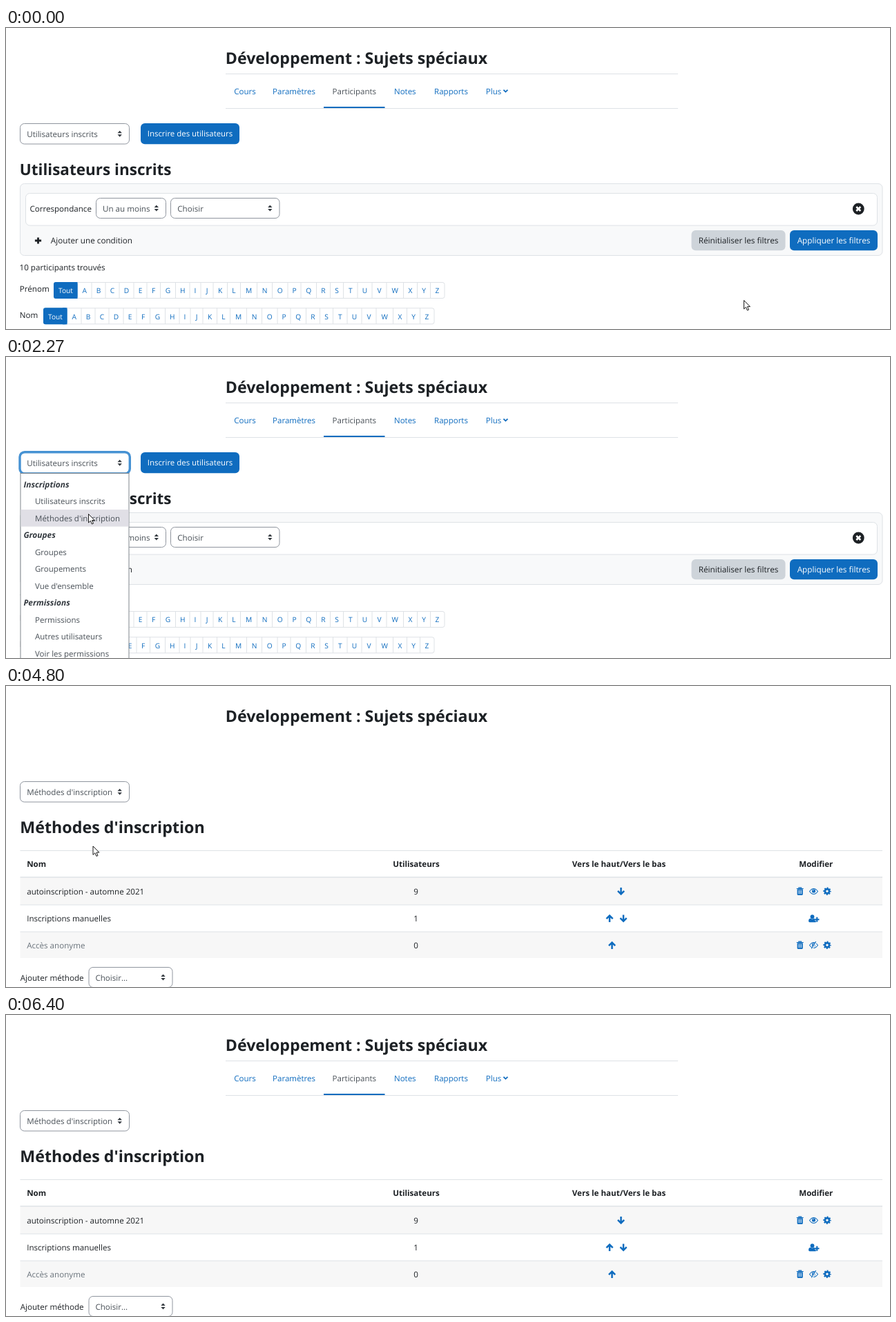
These frames come from a looping animation (1280x436 px, 7.59 s). An HTML page:

```html
<!DOCTYPE html>
<html lang="fr">
<head>
<meta charset="utf-8">
<title>Méthodes d'inscription</title>
<style>
html, body { margin: 0; width: 100%; height: 100%; overflow: hidden; background: #fff; }
svg { display: block; width: 100%; height: 100%; }
text { font-family: "Open Sans", "Noto Sans", sans-serif; white-space: pre; text-rendering: geometricPrecision; }
</style>
</head>
<body>
<svg id="stage" viewBox="0 0 1280 436"></svg>
<script>
const LOOP = 7590;
const BLUE = '#0f6cbf', INK = '#1d2125', GREY = '#495057', EDGE = '#8f959e', RULE = '#dee2e6';

// Drawing helpers
const text = (s, x, y, { size = 11.6, fill = INK, extra = '' } = {}) =>
  `<text x="${x}" y="${y}" font-size="${size}" fill="${fill}" ${extra}>${s}</text>`;
const mid = (s, x, y, o = {}) =>
  text(s, x, y, { ...o, extra: `text-anchor="middle" ${o.extra || ''}` });
const box = (x, y, w, h, fill, stroke = 'none', rx = 0, extra = '') =>
  `<rect x="${x}" y="${y}" width="${w}" height="${h}" rx="${rx}" fill="${fill}" stroke="${stroke}" ${extra}/>`;
const hline = (x1, x2, y, w = 1) =>
  `<path d="M${x1} ${y}H${x2}" stroke="${RULE}" stroke-width="${w}"/>`;
const group = (id, body) => `<g id="${id}">${body}</g>`;
const at = (x, y, body) => `<g transform="translate(${x} ${y})">${body}</g>`;
const bold = 'font-weight="700"';

const sorter = (x, y) =>
  at(x, y, `<path d="M-3.2-1L0-4.4 3.2-1ZM-3.2 1L0 4.4 3.2 1Z" fill="#343a40"/>`);
const select = (x, y, w, h, arrowX) =>
  box(x, y, w, h, '#fff', EDGE, 6) + sorter(arrowX, y + h / 2);
const button = (s, x, y, w, h, fill, ink, size) =>
  box(x, y, w, h, fill, 'none', 6) + mid(s, x + w / 2, y + h / 2 + 4.3, { size, fill: ink });

// Icons, each centred on its own origin
const arrowDown = `<path d="M0-5.4V4M-4.6-.6L0 4 4.6-.6" fill="none" stroke="${BLUE}" stroke-width="2.5"/>`;
const arrowUp = `<g transform="scale(1 -1)">${arrowDown}</g>`;
const trash = `<path d="M-5-3.8H5M-1.8-4V-5.2H1.8V-4" fill="none" stroke="${BLUE}" stroke-width="1.2"/>
  <path d="M-4.1-3H4.1V4.5Q4.1 5.6 3 5.6H-3Q-4.1 5.6-4.1 4.5Z" fill="${BLUE}"/>
  <path d="M-1.9-1.6V3.9M0-1.6V3.9M1.9-1.6V3.9" stroke="#fff" stroke-width=".8"/>`;
const eye = `<path d="M-6 0Q-3.2-4 0-4T6 0Q3.2 4 0 4T-6 0Z" fill="none" stroke="${BLUE}" stroke-width="1.1"/>
  <circle cy="-.6" r="2.6" fill="${BLUE}"/><path d="M-1.3-.7Q-1.2-2 0-2.1" fill="none" stroke="#fff" stroke-width=".7"/>`;
const eyeOff = eye + `<path d="M-2.6 5.4L4-5.6" stroke="#f7f7f7" stroke-width="2.6"/>
  <path d="M-3.2 5L3.2-5.4" stroke="${BLUE}" stroke-width="1.1"/>`;
const gear = `<circle r="3.1" fill="none" stroke="${BLUE}" stroke-width="2.8"/>
  <circle r="4.8" fill="none" stroke="${BLUE}" stroke-width="1.9" stroke-dasharray="1.885" stroke-dashoffset=".94"/>`;
const userPlus = `<circle cx="-2" cy="-2.6" r="2.9" fill="${BLUE}"/>
  <path d="M-7.4 3.6Q-7.4 0-4.6 0Q-2 1.6.6 0L1.4.4V3H3.2V5.4H-5.8Q-7.4 5.4-7.4 3.6Z" fill="${BLUE}"/>
  <path d="M4.8-2V5M1.4 1.5H8" stroke="${BLUE}" stroke-width="2.1"/>`;

// Course header
const title = text('Développement : Sujets spéciaux', 317.8, 51.5, { size: 23.15, extra: bold });

const tabs = [
  ['Cours', 346], ['Paramètres', 417], ['Participants', 504.3],
  ['Notes', 577.8], ['Rapports', 644.5], ['Plus', 706]
].map(([s, x]) => mid(s, x, 95.6, { size: 11.5, fill: s === 'Participants' ? GREY : BLUE })).join('');
const nav = hline(318, 973, 66.5) + hline(318, 973, 116.5) + tabs +
  box(460, 114, 88.5, 2, BLUE) +
  `<path d="M720.4 89.6L723.4 92.6 726.4 89.6" fill="none" stroke="${BLUE}" stroke-width="1.8"/>`;

// Initials bars
const cells = [20.5, 20, 20, 21, 19, 19.5, 22, 20.5, 16, 18, 20.5, 19, 24,
  22, 22.5, 19, 22.5, 20, 19, 20.5, 21, 21, 24.5, 20, 19, 20];
function initials(label, labelY, x, y) {
  let out = text(label, 19.8, labelY) +
    box(x + .5, y + .5, 565.5, 23, '#fff', RULE, 3) +
    box(x, y, 34.5, 24, BLUE, 'none', 3) + box(x + 28, y, 6.5, 24, BLUE) +
    mid('Tout', x + 17.5, y + 16.2, { size: 10.2, fill: '#fff' });
  let left = x + 34.5;
  cells.forEach((w, i) => {
    out += mid(String.fromCharCode(65 + i), left + w / 2, y + 16.2, { size: 10.2, fill: BLUE });
    left += w;
    if (i < 25) out += `<path d="M${left} ${y + .5}v23" stroke="${RULE}"/>`;
  });
  return out;
}

// Participants page
const users =
  button('Inscrire des utilisateurs', 195, 138, 143, 30.3, BLUE, '#fff', 11.45) +
  text('Utilisateurs inscrits', 19.8, 213, { size: 22.5, extra: bold }) +
  box(20.5, 225.5, 1248.5, 104, '#f8f9fa', RULE, 6) +
  box(28.5, 239.5, 1233, 46.5, '#fff', RULE, 6) +
  text('Correspondance', 34.4, 265.8) +
  select(130.5, 246.5, 101, 29, 217.8) + text('Un au moins', 140, 265.8, { fill: GREY }) +
  select(238.5, 246.5, 157.5, 29, 382.3) + text('Choisir', 248.3, 265.8, { fill: GREY }) +
  `<circle cx="1234.3" cy="262" r="8.4" fill="${INK}"/>
   <path d="M1231.3 259l6 6m0-6l-6 6" stroke="#fff" stroke-width="2.6"/>
   <path d="M46.5 303.4v9.2M41.9 308h9.2" stroke="${INK}" stroke-width="2.8"/>` +
  text('Ajouter une condition', 64.8, 312.4, { size: 11.7 }) +
  button('Réinitialiser les filtres', 992.5, 293, 136, 29.3, '#ced4da', INK, 11.75) +
  button('Appliquer les filtres', 1135, 293, 127, 29.3, BLUE, '#fff', 11.75) +
  text('10 participants trouvés', 19.6, 351) +
  initials('Prénom', 382, 69, 368) +
  initials('Nom', 419.5, 54, 405.3);

// Enrolment methods page
const rowTops = [277.5, 317, 356, 394];
const rowFills = ['#f7f7f7', '#fff', '#f7f7f7'];
const names = [
  ['autoinscription - automne 2021', INK, 9],
  ['Inscriptions manuelles', INK, 1],
  ['Accès anonyme', '#6a737b', 0]
];
const rows = names.map(([s, fill, count], i) => {
  const base = [301.6, 341, 379.6][i];
  return `<rect id="row${i}" x="20.5" y="${rowTops[i]}" width="1248.5" height="${rowTops[i + 1] - rowTops[i]}"/>` +
    text(s, 30.2, base, { fill }) + mid(count, 593.5, base);
}).join('');
const heads = [['Utilisateurs', 594], ['Vers le haut/Vers le bas', 887.5], ['Modifier', 1172.8]]
  .map(([s, x]) => mid(s, x, 262.4, { extra: bold })).join('');
const methods =
  text("Méthodes d'inscription", 20.3, 213, { size: 23.25, extra: bold }) +
  text('Nom', 30.2, 262.4, { extra: bold }) + heads + rows +
  hline(20.5, 1269, 238.5) + hline(20.5, 1269, 277, 1.6) + hline(20.5, 1269, 317) + hline(20.5, 1269, 356) +
  at(890.5, 297.5, arrowDown) + at(874, 336.5, arrowUp) + at(894, 336.8, arrowDown) + at(877.5, 375.5, arrowUp) +
  at(1149.7, 297.3, trash) + at(1169.5, 297.5, eye) + at(1189, 297.3, gear) +
  at(1169.5, 336.8, userPlus) +
  at(1149.7, 375.3, trash) + at(1169.5, 375.5, eyeOff) + at(1189, 375.3, gear) +
  text('Ajouter méthode', 20.7, 426.8) +
  select(120, 407.5, 121, 29, 227.5) + text('Choisir...', 129.4, 426.8, { fill: GREY });

// Page selector with its menu
const picker = select(20.5, 138.5, 158, 29.5, 164.7) +
  box(20, 137.7, 159.3, 31.3, 'none', '#4692d3', 7, 'id="ring" stroke-width="3.4"') +
  `<text id="choice" x="30.2" y="157.7" font-size="11.6" fill="${GREY}"></text>`;

const PITCH = 24.54;
const options = [
  ['Inscriptions', true], ['Utilisateurs inscrits'], ["Méthodes d'inscription"],
  ['Groupes', true], ['Groupes'], ['Groupements'], ["Vue d'ensemble"],
  ['Permissions', true], ['Permissions'], ['Autres utilisateurs'], ['Voir les permissions']
].map(([s, heading], i) => {
  const y = 188.6 + PITCH * i;
  return heading
    ? text(s, 25.4, y, { size: 11.9, fill: '#343a40', extra: bold + ' font-style="italic"' })
    : text(s, 42, y, { size: 11.5, fill: GREY });
}).join('');
const menu = box(21, 168.5, 157, 280, '#fff', '#80868c') +
  box(21.5, 0, 156, PITCH, '#e0dfe6', 'none', 0, 'id="hover"') + options;

const pointer = `<path d="M.5.5V13L3.4 10.3 5.4 15 7.5 14.1 5.5 9.6H9.4Z" fill="#fff" stroke="#000" stroke-width=".9"/>`;

const stage = document.getElementById('stage');
stage.innerHTML = box(0, 0, 1280, 436, '#fff') + title + group('nav', nav) + group('users', users) +
  group('methods', methods) + picker + group('menu', menu) + group('pointer', pointer);
const el = id => document.getElementById(id);

// Pointer legs: first step, last step, number of steps, destination
const legs = [
  [70, 800, 12, 164, 155],
  [1470, 1730, 5, 118, 198],
  [1796, 2000, 4, 119.5, 227],
  [2270, 2270, 1, 119, 227],
  [3070, 3070, 1, 120, 227],
  [3930, 3930, 1, 122, 228],
  [3997, 4200, 4, 125.5, 231.5],
  [5730, 5930, 4, 96, 313.5],
  [5997, 6400, 7, 70, 440]
];
const smooth = p => p * p * (3 - 2 * p);

function pointerAt(t) {
  let x = 1068, y = 394;
  for (const [start, end, steps, toX, toY] of legs) {
    if (t < start) break;
    const done = t >= end ? steps : Math.floor((t - start) / (end - start) * (steps - 1)) + 1;
    const p = steps === 12 ? smooth(done / steps) : done / steps;
    x += (toX - x) * p;
    y += (toY - y) * p;
  }
  return [x, y];
}

const show = (id, on) => el(id).setAttribute('visibility', on ? 'visible' : 'hidden');

function draw(t) {
  const [x, y] = pointerAt(t);
  const second = t >= 4800;
  const picked = t >= 4470;
  show('users', !second);
  show('methods', second);
  show('nav', !second || t >= 5130);
  show('menu', t >= 1265 && !picked);

  const ring = t < 1200 || second ? 0 : t < 1265 ? .4 : t < 1330 ? .75 : 1;
  el('ring').setAttribute('opacity', ring);
  el('choice').textContent = picked ? "Méthodes d'inscription" : 'Utilisateurs inscrits';
  el('hover').setAttribute('y', 172 + PITCH * (y >= 221 ? 2 : 1));

  rowFills.forEach((fill, i) => {
    const over = second && y >= rowTops[i] && y < rowTops[i + 1];
    el('row' + i).setAttribute('fill', over ? '#ececec' : fill);
  });
  el('pointer').setAttribute('transform', `translate(${x} ${y})`);
}

const begin = performance.now();
function tick() {
  draw((performance.now() - begin) % LOOP);
  requestAnimationFrame(tick);
}
tick();
</script>
</body>
</html>
```
